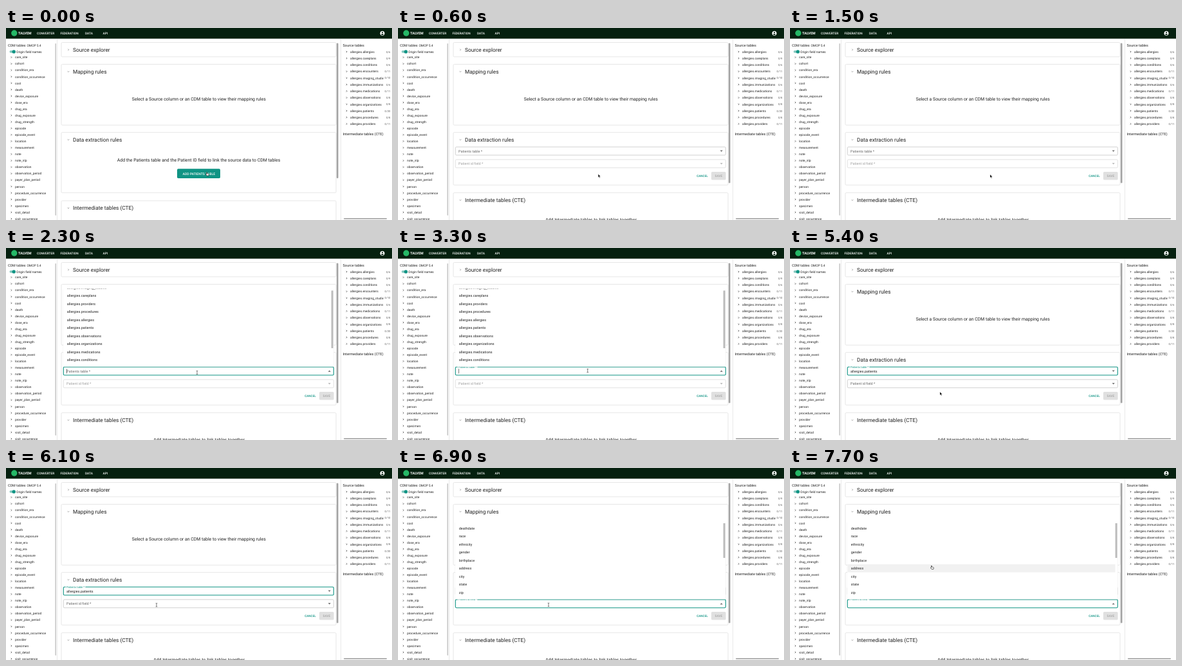
An HTML page that plays this animation: 600x299 px, repeating every 8000 ms.

```html
<!DOCTYPE html>
<html lang="en">
<head>
<meta charset="utf-8">
<title>Mapping converter</title>
<style>
html, body { margin: 0; width: 100%; height: 100%; overflow: hidden; background: #fff; }
svg { display: block; width: 600px; height: 299px; }
text { font-family: Roboto, sans-serif; text-rendering: geometricPrecision; white-space: pre; }
</style>
</head>
<body>
<svg id="stage" viewBox="0 0 600 299" xmlns="http://www.w3.org/2000/svg"></svg>
<script>
const LOOP = 8000;
const INK = '#212121', GREY = '#666', PALE = '#9e9e9e', TEAL = '#109484', EDGE = '#e0e0e0';
const ROW = 12.5;
const stage = document.getElementById('stage');

function add(parent, tag, attrs) {
  const el = document.createElementNS('http://www.w3.org/2000/svg', tag);
  set(el, attrs);
  parent.appendChild(el);
  return el;
}
function set(el, attrs) {
  for (const k in attrs) el.setAttribute(k, attrs[k]);
}
const group = (parent = stage, attrs = {}) => add(parent, 'g', attrs);
const show = (el, on) => el.setAttribute('display', on ? 'inline' : 'none');
const rect = (p, x, y, width, height, fill, more = {}) =>
  add(p, 'rect', { x, y, width, height, fill, ...more });
const path = (p, d, more) => add(p, 'path', { d, fill: 'none', ...more });

// cy is the middle of the capital letters
function text(p, str, x, cy, size, fill = INK, more = {}) {
  const el = add(p, 'text', { x, y: cy + size * 0.36, 'font-size': size, fill, ...more });
  el.textContent = str;
  return el;
}
function chevron(p, x, y, down, size, color) {
  const d = down ? `M${x - size} ${y - size / 2}l${size} ${size}l${size} ${-size}`
                 : `M${x - size / 2} ${y - size}l${size} ${size}l${-size} ${size}`;
  path(p, d, { stroke: color, 'stroke-width': 0.7 });
}
function clipBox(id, x, y, width, height) {
  rect(add(stage, 'clipPath', { id }), x, y, width, height, '#000');
  return { 'clip-path': `url(#${id})` };
}

function panel(p, y, height, title, open = true) {
  const box = rect(p, 86, y, 427, height, '#fff', { stroke: EDGE, 'stroke-width': 0.8, rx: 1.5 });
  chevron(p, 97, y + 11.4, open, 1.3, '#777');
  text(p, title, 104, y + 11.4, 8.3);
  return box;
}

function buildLeft() {
  const g = group();
  text(g, 'CDM tables', 3, 27, 5.35);
  text(g, 'OMOP 5.4', 32.5, 27.1, 4.9);
  rect(g, 5.5, 35.1, 8.6, 3.6, '#88c9c1', { rx: 1.8 });
  add(g, 'circle', { cx: 12.2, cy: 36.9, r: 2.7, fill: TEAL });
  text(g, 'Origin field names', 16, 36.8, 4.95);
  const tables = ('care_site cohort condition_era condition_occurrence cost death device_exposure ' +
    'dose_era drug_era drug_exposure drug_strength episode episode_event location measurement ' +
    'note note_nlp observation observation_period payer_plan_period person procedure_occurrence ' +
    'provider specimen visit_detail visit_occurrence').split(' ');
  tables.forEach((name, i) => {
    const y = 45.6 + i * 10.06;
    chevron(g, 8.3, y, false, 1.2, INK);
    text(g, name, 14, y, 4.86);
  });
  rect(g, 76.4, 24, 1.6, 268, '#c6c6c6', { rx: 0.8 });
  rect(g, 79.2, 17, 0.7, 282, EDGE);
}

function buildRight() {
  const g = group();
  rect(g, 520, 17, 0.7, 282, EDGE);
  text(g, 'Source tables', 523.5, 27, 5.5);
  const names = ('allergies careplans conditions encounters imaging_studies immunizations ' +
    'medications observations organizations patients procedures providers').split(' ');
  const counts = [6, 9, 6, 11, 10, 6, 11, 8, 8, 20, 8, 11];
  const inner = group(g, clipBox('names', 520, 30, 66.5, 130));
  names.forEach((name, i) => {
    const y = 37 + i * 10.22;
    chevron(inner, 529.5, y, false, 1.2, INK);
    text(inner, 'allergies.' + name, 535, y, 4.87);
    text(g, '0/' + counts[i], 597.5, y, 4.25, GREY, { 'text-anchor': 'end' });
  });
  text(g, 'Intermediate tables (CTE)', 523.5, 165, 5.57);
  rect(g, 525, 296, 67, 1.7, '#a8a8a8', { rx: 0.8 });
}

function buildHeader() {
  const g = group();
  rect(g, 0, 0, 600, 16.6, '#05200f');
  add(g, 'circle', { cx: 12.8, cy: 8, r: 4.7, fill: '#25b866' });
  text(g, 'TALVEM', 19, 8.2, 5.45, '#fff', { 'font-weight': 700 });
  [['CONVERTER', 48], ['FEDERATION', 84.5], ['DATA', 123], ['API', 150.5]].forEach(([s, x]) =>
    text(g, s, x, 8.4, 4.8, '#fff', { 'font-weight': 500 }));
  add(g, 'circle', { cx: 585, cy: 8.3, r: 3.5, fill: '#fff' });
  add(g, 'circle', { cx: 585, cy: 7.1, r: 1.1, fill: '#05200f' });
  path(g, 'M582.8 10Q585 8 587.2 10Q585 12.2 582.8 10Z', { fill: '#05200f' });
}

function buildField(p, y, name) {
  const g = group(p);
  const box = rect(g, 89.3, y, 420, 12.8, '#fff', { rx: 1.6 });
  const notch = rect(g, 92.8, y - 1, 30.5, 2, '#fff');
  const label = text(g, name + ' *', 94, y + 6.5, 5.48);
  const value = text(g, 'allergies.patients', 94, y + 6.5, 5.48);
  const caret = rect(g, 94.2, y + 3, 0.6, 7.2, INK);
  const arrow = path(g, '', {});
  // lift: 0 label at rest, 1 label on the top edge
  return ({ focus, lift, filled, blink, open, disabled }) => {
    set(box, { stroke: focus ? TEAL : disabled ? '#d6d6d6' : '#bdbdbd', 'stroke-width': focus ? 1.1 : 0.7 });
    const size = 5.48 - 1.36 * lift;
    set(label, {
      'font-size': size, y: y + 6.5 * (1 - lift) + size * 0.36,
      fill: focus && lift > 0 ? TEAL : disabled ? PALE : GREY
    });
    show(notch, lift > 0.5);
    show(value, filled);
    show(caret, blink);
    const s = open ? -1 : 1;
    set(arrow, {
      d: `M500.6 ${y + 6.4 - s * 1.1}h4.2l-2.1 ${s * 2.2}z`,
      fill: disabled ? '#b5b5b5' : GREY
    });
  };
}

function buildList(top, bottom, firstY, items, thumb, id) {
  const g = group();
  rect(g, 88.6, top + 0.6, 421.4, bottom - top, '#000', { opacity: 0.07, rx: 1.5 });
  rect(g, 89, top, 420.5, bottom - top, '#fff', { rx: 1.2 });
  const inner = group(g, clipBox(id, 89, top, 420.5, bottom - top));
  const hover = rect(inner, 89.5, 0, 416, ROW, '#f1f1f1');
  items.forEach((s, i) => text(inner, s, 94.8, firstY + i * ROW, 5.46));
  rect(g, 505.7, thumb[0], 2.8, thumb[1] - thumb[0], '#b9b9b9', { rx: 0.6 });
  return {
    holds: (x, y) => x > 89 && x < 509.5 && y > top && y < bottom,
    draw(open, x, y) {
      show(g, open);
      const over = this.holds(x, y);
      show(hover, over);
      if (over) {
        const i = Math.floor((y - firstY) / ROW + 0.5);
        set(hover, { y: firstY + (i - 0.5) * ROW });
      }
    }
  };
}

buildLeft();
buildRight();

const main = group(stage, clipBox('main', 81, 22, 438, 277));
panel(main, 22.5, 22.3, 'Source explorer', false);
panel(main, 56.5, 94.7, 'Mapping rules');
text(main, 'Select a Source column or an CDM table to view their mapping rules', 299.8, 110.8, 6.93, INK,
  { 'text-anchor': 'middle' });
const extract = panel(main, 162.6, 94, 'Data extraction rules');
const lower = group(main);
panel(lower, 256.6, 90, 'Intermediate tables (CTE)');
text(lower, 'Add Intermediate tables to link tables together', 300, 298.6, 6.92, INK, { 'text-anchor': 'middle' });
const thumb = rect(main, 513.9, 23.5, 2.6, 210, '#a3a3a3', { rx: 1.2 });

const intro = group(main);
text(intro, 'Add the Patients table and the Patient ID field to link the source data to CDM tables',
  299.5, 205.2, 6.91, INK, { 'text-anchor': 'middle' });
rect(intro, 266, 219.3, 67, 14.8, TEAL, { rx: 1.8 });
const ripple = rect(intro, 266, 219.3, 67, 14.8, '#fff', { rx: 1.8 });
text(intro, 'ADD PATIENTS TABLE', 299.8, 226.7, 5.1, '#fff', { 'text-anchor': 'middle', 'font-weight': 500 });

const form = group(main);
const drawTable = buildField(form, 185.2, 'Patients table');
const drawId = buildField(form, 204.9, 'Patient id field');
text(form, 'CANCEL', 473, 230.2, 4.65, TEAL, { 'text-anchor': 'middle', 'font-weight': 500 });
rect(form, 487, 223.9, 22.6, 12.6, '#e0e0e0', { rx: 1.6 });
text(form, 'SAVE', 498.4, 230.2, 4.8, '#a6a6a6', { 'text-anchor': 'middle', 'font-weight': 500 });

const tableList = buildList(63.4, 184.7, 61.6,
  ('imaging_studies careplans providers procedures allergies patients observations organizations ' +
   'medications conditions encounters').split(' ').map(s => 'allergies.' + s), [66.3, 156], 'tables');
const idList = buildList(84, 204.4, 81.2,
  'birthdate deathdate race ethnicity gender birthplace address city state zip'.split(' '), [86, 140], 'ids');
buildHeader();

const pointer = group();
const shapes = {
  arrow: path(pointer, 'M0 0V5.2L1.2 4.1L2.1 6.1L3 5.7L2.1 3.8H3.7Z',
    { fill: '#000', stroke: '#fff', 'stroke-width': 0.4 }),
  hand: path(pointer, 'M-.5 .3Q0-.4 .5 .3V2.1L2.8 2.6Q3.5 2.8 3.4 3.5L3 5.6H.2L-1.5 3.5Q-1.4 2.7-.5 3.3Z',
    { fill: '#fff', stroke: '#111', 'stroke-width': 0.6 }),
  beam: path(pointer, 'M-1.3-2.8Q0-2.8 0-2.1Q0-2.8 1.3-2.8M0-2.1V2.1M-1.3 2.8Q0 2.8 0 2.1Q0 2.8 1.3 2.8',
    { stroke: '#222', 'stroke-width': 0.6 })
};

// start, end, x, y of each pointer move
const START = [312, 224.5];
const MOVES = [
  [300, 700, 311, 228], [1700, 2150, 297, 194], [3200, 4000, 246, 123.5],
  [5100, 5400, 233, 224], [5700, 6150, 234, 213], [6900, 7500, 220, 152]
];
const clamp = v => Math.max(0, Math.min(1, v));
const ease = v => v * v * (3 - 2 * v);
const between = (t, a, b) => t >= a && t < b;

function pointerAt(t) {
  let [x, y] = START;
  for (const [a, b, tx, ty] of MOVES) {
    const k = ease(clamp((t - a) / (b - a)));
    x += (tx - x) * k;
    y += (ty - y) * k;
  }
  return [x, y];
}

const FORM = 400, OPEN1 = 2250, PICK = 4800, OPEN2 = 6200;
const blinkOn = (t, from) => (t - from) % 1000 < 500;

function draw(t) {
  const [x, y] = pointerAt(t);
  const editing = t >= FORM;
  const open1 = between(t, OPEN1, PICK), open2 = t >= OPEN2;
  const picked = t >= PICK;

  show(intro, !editing);
  show(form, editing);
  set(ripple, { opacity: between(t, 100, FORM) ? 0.25 * Math.sin(Math.PI * (t - 100) / 300) : 0 });
  set(extract, { height: editing ? 82 : 94 });
  set(lower, { transform: `translate(0 ${editing ? 0 : 12.4})` });
  set(thumb, { height: editing ? 218 : 210.5 });

  drawTable({
    focus: between(t, OPEN1, OPEN2), lift: ease(clamp((t - OPEN1 - 70) / 200)), filled: picked,
    blink: open1 && blinkOn(t, OPEN1), open: open1, disabled: false
  });
  drawId({
    focus: open2, lift: ease(clamp((t - OPEN2 - 70) / 200)), filled: false,
    blink: open2 && blinkOn(t, OPEN2), open: open2, disabled: !picked
  });
  tableList.draw(open1, x, y);
  idList.draw(open2, x, y);

  const inField = top => x > 89 && x < 500 && y > top && y < top + 13;
  let kind = 'arrow';
  if (!editing || open1 && tableList.holds(x, y) || open2 && idList.holds(x, y)) kind = 'hand';
  else if (inField(185) || picked && inField(205)) kind = 'beam';
  for (const k in shapes) show(shapes[k], k === kind);
  set(pointer, { transform: `translate(${x} ${y})` });
}

const began = performance.now();
function tick() {
  draw((performance.now() - began) % LOOP);
  requestAnimationFrame(tick);
}
draw(0);
requestAnimationFrame(tick);
</script>
</body>
</html>
```
